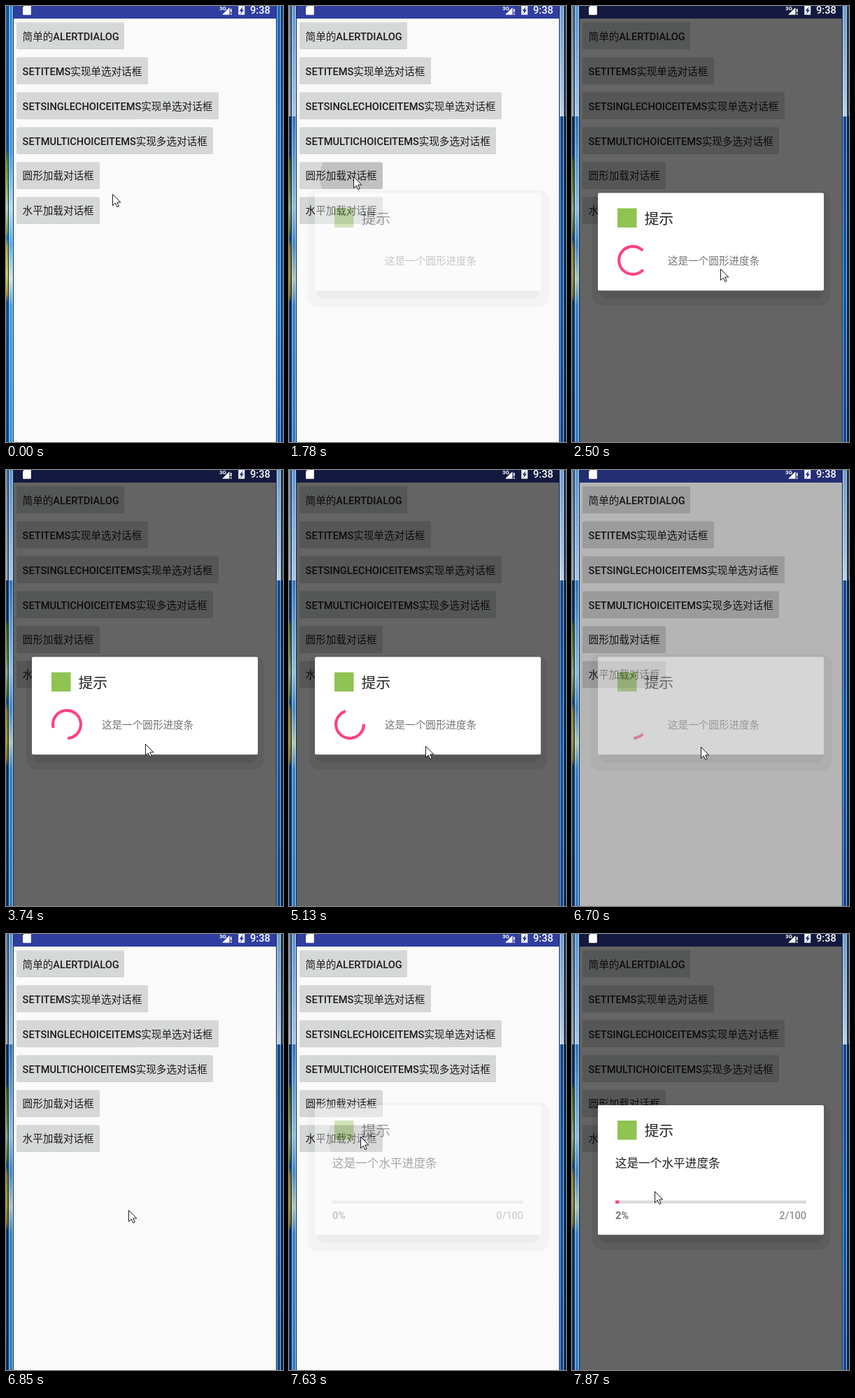
An HTML page for the animation above (7.99 s loop, 396 by 624 pixels).

```html
<!DOCTYPE html>
<html lang="zh-CN">
<head>
<meta charset="utf-8">
<title>对话框</title>
<style>
html, body { margin: 0; width: 100%; height: 100%; overflow: hidden; background: #fafafa; }
svg { display: block; width: 396px; height: 624px; }
text { font: 400 14.58px Roboto, "Noto Sans CJK SC", "Noto Sans CJK", sans-serif; white-space: pre; }
.btn { fill: #d6d7d7; filter: drop-shadow(0 .8px .7px rgba(0,0,0,.28)); }
.label { fill: #1d1d1d; }
.latin { font-weight: 500; }
.title { font-size: 20.83px; fill: #212121; }
.body { font-size: 16.67px; fill: #212121; }
.note { fill: #757575; }
.bold { font-weight: 700; }
.clock { font-weight: 500; fill: #fff; }
.tiny { font-size: 8px; font-weight: 700; fill: #fff; }
</style>
</head>
<body>
<svg id="stage" viewBox="0 0 396 624" xmlns="http://www.w3.org/2000/svg">
  <defs id="defs"></defs>
  <rect x="10" width="377" height="624" fill="#fafafa"/>
  <rect x="11" width="375" height="18" fill="#303f9f"/>
  <g id="buttons"></g>
  <circle id="ripple" fill="#000" fill-opacity=".1"/>
  <rect id="dim" x="11" width="375" height="624" fill="#000"/>
  <g id="status" fill="#fff">
    <path d="M27.5 -1.5H35.8V11.5Q35.8 12.7 34.6 12.7H25.2Q24 12.7 24 11.5V2Z"/>
    <text class="tiny" x="305" y="5.5">3G</text>
    <path d="M309 12.5L319.5 2V12.5ZM320.8 4h1.8v5h-1.8zM320.8 10.6h1.8v1.9h-1.8z"/>
    <path d="M332.2 -.5H341.2V12.5H332.2Z"/>
    <path d="M338.6 .8L333.6 7.2H336.3L335 11.8L340 5.4H337.3Z" fill="#252f78"/>
    <text class="clock" x="349" y="11">9:38</text>
  </g>
  <g id="round"></g>
  <g id="bar"></g>
  <g id="edges"></g>
  <path id="pointer" d="M.5 .5V16.6L4.2 13L6.8 18.6L9.2 17.5L6.7 12H11.8Z"
        fill="#fff" stroke="#1a1a24" stroke-width="1" stroke-linejoin="round"/>
</svg>
<script>
const LOOP = 7990;
const NS = 'http://www.w3.org/2000/svg';
const $ = id => document.getElementById(id);

function set(node, attrs) {
  for (const k in attrs) node.setAttribute(k, attrs[k]);
  return node;
}
function add(parent, tag, attrs, text) {
  const node = set(document.createElementNS(NS, tag), attrs);
  if (text !== undefined) node.textContent = text;
  return parent.appendChild(node);
}
function rect(parent, x, y, width, height, fill, more) {
  return add(parent, 'rect', { x, y, width, height, fill, ...more });
}

// Screen updates happen only at these times.
const ticks = [
  0, 280,
  960, 1100, 1230, 1370, 1510, 1640, 1780, 1930,
  2080, 2210, 2350, 2500, 2630, 2750, 2880, 3010,
  3160, 3300, 3440, 3580, 3720, 3860, 3990, 4130,
  4280, 4430, 4570, 4710, 4850, 4990, 5130, 5280,
  5400, 5530, 5660, 5790, 5910, 6040, 6170, 6290, 6420,
  6550, 6700, 6850, 6970, 7090,
  7360, 7490, 7620, 7740, 7870
];

// Pointer path: time, x, y.
const path = [
  [0, 152, 269], [960, 150, 272], [1510, 92, 244], [1780, 92, 244],
  [1930, 112, 254], [2500, 212, 376], [3010, 212, 376], [3580, 200, 391],
  [4130, 195, 395], [5280, 195, 395], [5790, 192, 397], [6550, 192, 397],
  [6850, 175, 395], [7090, 102, 290], [7620, 102, 290], [7870, 118, 368]
];

function along(table, t) {
  let i = 0;
  while (i < table.length - 2 && t >= table[i + 1][0]) i++;
  const a = table[i], b = table[i + 1];
  const k = Math.min(1, Math.max(0, (t - a[0]) / (b[0] - a[0])));
  return a.slice(1).map((v, j) => v + (b[j + 1] - v) * k);
}

// Buttons
const buttons = [
  [154, '简单的', 'ALERTDIALOG', ''],
  [188, '', 'SETITEMS', '实现单选对话框'],
  [289, '', 'SETSINGLECHOICEITEMS', '实现单选对话框'],
  [281, '', 'SETMULTICHOICEITEMS', '实现多选对话框'],
  [118.7, '圆形加载对话框', '', ''],
  [118.7, '水平加载对话框', '', '']
];
buttons.forEach(([w, before, latin, after], i) => {
  const y = 23.7 + 50 * i;
  add($('buttons'), 'rect', { class: 'btn', x: 15, y, width: w, height: 38, rx: 2 });
  const label = add($('buttons'), 'text', { class: 'label', x: 23.6, y: (latin ? 49 : 48) + 50 * i });
  if (before) add(label, 'tspan', {}, before);
  if (latin) add(label, 'tspan', { class: 'latin' }, latin);
  if (after) add(label, 'tspan', {}, after);
  if (i > 3) {
    const clip = add($('defs'), 'clipPath', { id: 'clip' + i });
    rect(clip, 15, y, w, 38, '#000', { rx: 2 });
  }
});

// Dialog card with its wide shadow plates
function dialog(group, top, bottom) {
  const plate = rect(group, 29, top - 2, 340, bottom - top + 23.5, '#000',
    { rx: 14, 'fill-opacity': .075 });
  rect(group, 39, top + 8, 319.5, bottom - top + 4, '#000', { rx: 10, 'fill-opacity': .07 });
  rect(group, 37, top, 323, bottom - top, '#fff', { rx: 2 });
  rect(group, 65, top + 22, 27.5, 27.5, '#8fc352');
  add(group, 'text', { class: 'title', x: 103.5, y: Math.round(top + 44.3) }, '提示');
  return grow => set(plate, {
    x: 29 - 2.5 * grow, y: top - 2 - 2 * grow,
    width: 340 + 5 * grow, height: bottom - top + 23.5 + 4 * grow
  });
}

const round = $('round'), bar = $('bar');
const growRound = dialog(round, 267.5, 407.2);
add(round, 'text', { class: 'note', x: 137, y: 370 }, '这是一个圆形进度条');
const arc = add(round, 'path', { fill: 'none', stroke: '#ff4081', 'stroke-width': 4.1, 'stroke-linecap': 'square' });

const growBar = dialog(bar, 245, 430.5);
add(bar, 'text', { class: 'body', x: 61.8, y: 333.5 }, '这是一个水平进度条');
rect(bar, 62, 381.5, 273, 4.2, '#dadada');
const fill = rect(bar, 62, 381.5, 0, 4.2, '#ff4081');
const percent = add(bar, 'text', { class: 'note bold', x: 62, y: 407.6 }, '');
const count = add(bar, 'text', { class: 'note', x: 335, y: 407.6, 'text-anchor': 'end' }, '');

// Desktop strips beside the window
function gradient(id, stops) {
  const g = add($('defs'), 'linearGradient',
    { id, gradientUnits: 'userSpaceOnUse', x1: 0, y1: 0, x2: 0, y2: 624 });
  stops.forEach(([y, color]) => add(g, 'stop', { offset: y / 624, 'stop-color': color }));
  return `url(#${id})`;
}
function strips(name, wall, frame, side, shade) {
  const g = add($('edges'), 'g', {});
  const column = (x, w, color, alpha = 1) =>
    rect(g, x, 0, w, 624, color, { 'fill-opacity': alpha });
  column(0, 4, gradient(name + 'Wall', wall));
  column(1, 2, '#000', shade);
  column(4, 6, gradient(name + 'Frame', frame));
  column(386, 10, gradient(name + 'Side', side));
  column(394, 2, '#04101f', shade * 2);
  // glass rims: dark outline with a light line inside it
  [3, 10, 386, 393].forEach(x => column(x, 1, '#0a2342'));
  [4, 9, 387, 392].forEach(x => column(x, 1, '#e4f2ff', .65));
  return g;
}
const idle = strips('idle',
  [[0, '#1b6cc0'], [205, '#1463b4'], [220, '#5d9a30'], [260, '#9ccc5c'], [290, '#d8efc4'],
   [322, '#7fb850'], [332, '#1f86d6'], [345, '#c9bb3c'], [385, '#f0e678'], [412, '#c8a92a'],
   [424, '#1a5fb0'], [624, '#0d50a2']],
  [[0, '#2f93e4'], [210, '#38a0ec'], [290, '#b4e2f4'], [340, '#4db0f0'], [390, '#d6ecc8'],
   [430, '#3aa4ee'], [624, '#2b9bea']],
  [[0, '#1a68c4'], [200, '#1c74d2'], [420, '#1a78d8'], [624, '#1460ba']], .15);
const active = strips('active',
  [[0, '#7ea3cb'], [120, '#a9c4de'], [158, '#b9cfe4'], [158, '#123f78'], [215, '#124a8c'],
   [222, '#4a7d26'], [265, '#7ea848'], [290, '#b4cfa0'], [322, '#5f9040'], [332, '#1a62a4'],
   [346, '#a89a30'], [385, '#c9b83e'], [414, '#a3892a'], [424, '#124a8c'], [624, '#0e3f7c']],
  [[0, '#5d95d0'], [158, '#a6c6e6'], [158, '#2f76bf'], [290, '#8fc0dc'], [340, '#3d86cc'],
   [390, '#b0c8b0'], [430, '#3583cc'], [624, '#2f80cc']],
  [[0, '#6f9bcb'], [120, '#a3c0de'], [158, '#bdd2e8'], [158, '#0f4a94'], [400, '#1358ac'], [624, '#0f4a94']], .35);

// Easing given by a cubic curve from (x0,0) to (x3,1), flat at both ends
function ease(x0, x1, x2, x3) {
  return p => {
    if (p <= x0) return 0;
    if (p >= x3) return 1;
    let lo = 0, hi = 1;
    for (let i = 0; i < 24; i++) {
      const s = (lo + hi) / 2, r = 1 - s;
      const x = r * r * r * x0 + 3 * r * r * s * x1 + 3 * r * s * s * x2 + s * s * s * x3;
      if (x < p) lo = s; else hi = s;
    }
    return lo * lo * (3 - 2 * lo);
  };
}
const head = ease(0, .2, .1, .5);
const tail = ease(.5, .7, .6, 1);

function spin(t) {
  const turns = (740 + (t - 2500) * 1.032) / 1333;
  if (turns < 0) return set(arc, { visibility: 'hidden' });
  const p = turns % 1;
  const base = 144 * turns + 90 * p;
  const from = base + 270 * tail(p);
  const to = Math.max(base + 270 * head(p), from + 1);
  const at = deg => {
    const a = (deg - 90) * Math.PI / 180;
    return `${87 + 19.9 * Math.cos(a)} ${364 + 19.9 * Math.sin(a)}`;
  };
  set(arc, {
    visibility: 'inherit',
    d: `M${at(from)}A19.9 19.9 0 ${to - from > 180 ? 1 : 0} 1 ${at(to)}`
  });
}

// Time, opacity of each dialog, dimming; each row holds until the next
const states = [
  [0, 0, 0, 0], [1780, .38, 0, 0], [1930, 1, 0, .6], [6700, .45, 0, .28],
  [6850, 0, 0, 0], [7620, 0, .38, 0], [7740, 0, 1, .6]
];

function press(t) {
  const second = t >= 7360;
  const start = second ? 7360 : 1510, end = second ? 7740 : 1930;
  const on = t >= start && t < end;
  set($('ripple'), {
    visibility: on ? 'visible' : 'hidden',
    cx: second ? 102 : 92, cy: second ? 292 : 244,
    r: on ? 10 + 38 * Math.min(1, (t - start) / 270) : 0,
    'clip-path': `url(#clip${second ? 5 : 4})`
  });
}

function show(group, alpha) {
  set(group, { opacity: alpha, visibility: alpha ? 'visible' : 'hidden' });
}

function draw(time) {
  const t = ticks.filter(v => v <= time).pop();
  const [, a, b, dim] = states.filter(s => s[0] <= t).pop();
  show(round, a);
  show(bar, b);
  growRound(a < 1 ? 1 : 0);
  growBar(b < 1 ? 1 : 0);
  set($('dim'), { 'fill-opacity': dim });
  show(idle, t < 1510 ? 1 : 0);
  show(active, t < 1510 ? 0 : 1);
  press(t);
  if (a) spin(t);

  const done = Math.max(0, Math.min(100, Math.floor((t - 7610) / 130)));
  set(fill, { width: 2.73 * done });
  percent.textContent = done + '%';
  count.textContent = done + '/100';

  const [x, y] = along(path, t);
  set($('pointer'), {
    transform: `translate(${Math.round(x)} ${Math.round(y)})`,
    visibility: t >= 280 && t < 960 ? 'hidden' : 'visible'
  });
}

const begin = performance.now();
function loop() {
  draw((performance.now() - begin) % LOOP);
  requestAnimationFrame(loop);
}
loop();
</script>
</body>
</html>
```
